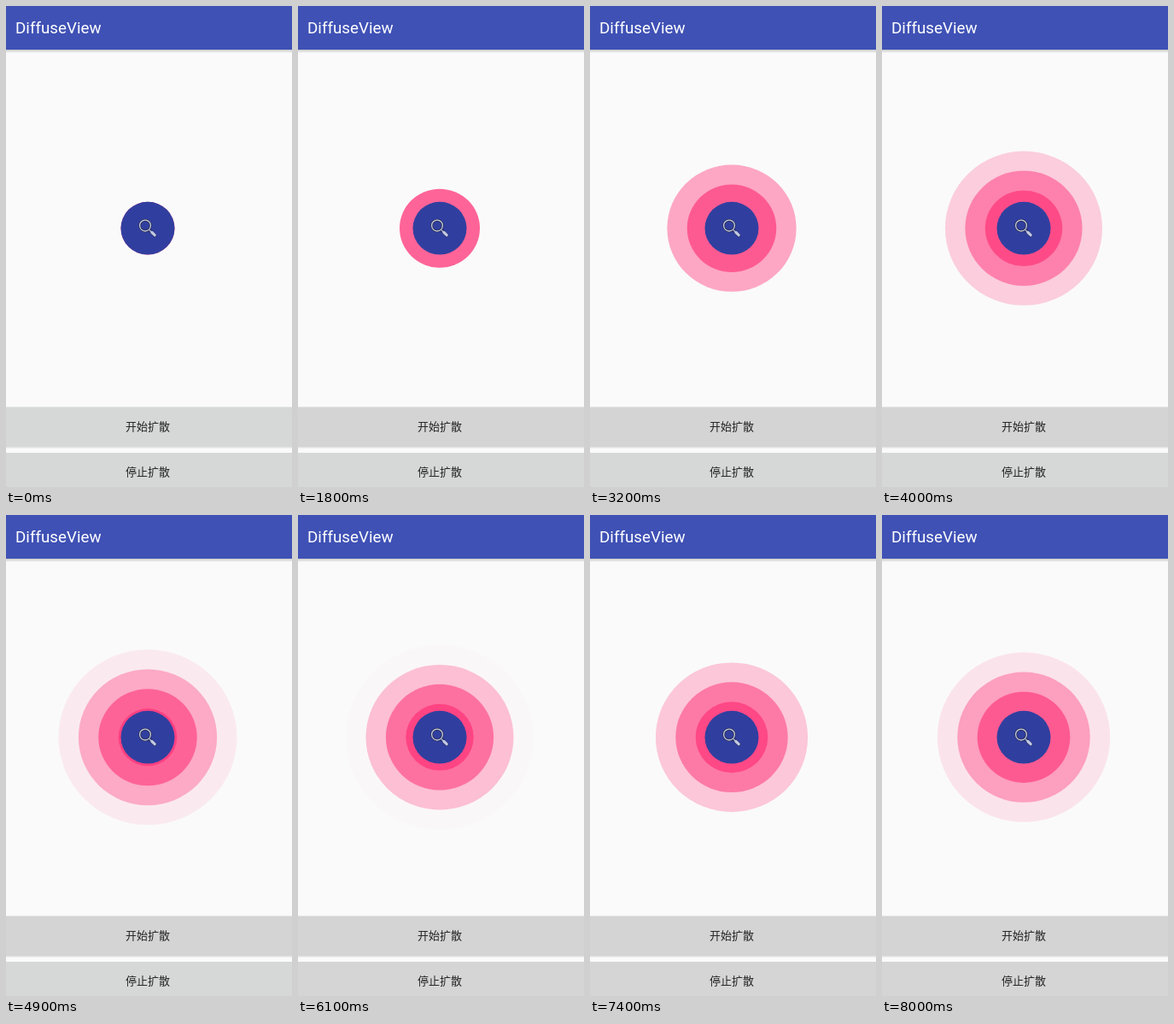
These frames come from a looping animation (335 by 562 pixels, 8.1 s). An HTML page with a canvas:

```html
<!DOCTYPE html>
<html lang="zh">
<head>
<meta charset="utf-8">
<title>DiffuseView</title>
<style>
  html, body { margin: 0; width: 100%; height: 100%; overflow: hidden; background: #fafafa; }
  canvas { display: block; width: 335px; height: 562px; }
</style>
</head>
<body>
<canvas id="stage"></canvas>
<script>
const W = 335, H = 562, LOOP = 8100, STEP = 100;
const CX = 166, CY = 259.7, SQUASH = 0.98;
const CORE = 31.5, GAP = 23.4, FADE = 79.6;

const canvas = document.getElementById('stage');
const ctx = canvas.getContext('2d');
const dpr = window.devicePixelRatio || 1;
canvas.width = W * dpr;
canvas.height = H * dpr;
ctx.scale(dpr, dpr);

function rect(y, h, color) {
  ctx.fillStyle = color;
  ctx.fillRect(0, y, W, h);
}

function shadow(y, h, strength) {
  const g = ctx.createLinearGradient(0, y, 0, y + h);
  g.addColorStop(0, `rgba(0,0,0,${strength})`);
  g.addColorStop(1, 'rgba(0,0,0,0)');
  rect(y, h, g);
}

function disc(r, color) {
  ctx.fillStyle = color;
  ctx.beginPath();
  ctx.ellipse(CX, CY, r, r * SQUASH, 0, 0, Math.PI * 2);
  ctx.fill();
}

function line(x1, y1, x2, y2, width, color) {
  ctx.strokeStyle = color;
  ctx.lineWidth = width;
  ctx.beginPath();
  ctx.moveTo(x1, y1);
  ctx.lineTo(x2, y2);
  ctx.stroke();
}

function lens(r, width, color) {
  ctx.strokeStyle = color;
  ctx.lineWidth = width;
  ctx.beginPath();
  ctx.arc(163, 256.6, r, 0, Math.PI * 2);
  ctx.stroke();
}

function searchIcon() {
  ctx.lineCap = 'round';
  line(168, 261.8, 174.2, 267.9, 4.6, '#28336f');
  lens(6.3, 3, '#28305f');
  lens(6.4, 1.3, '#c9cbd8');
  line(168.2, 262, 170.5, 264.2, 1.3, '#b4b8cf');
  line(170.9, 264.5, 174.2, 267.7, 3.2, '#c3c8e2');
}

function header() {
  rect(0, 51, '#3f51b5');
  shadow(51, 4, 0.2);
  ctx.fillStyle = '#fff';
  ctx.font = '18.8px Roboto, sans-serif';
  ctx.textAlign = 'left';
  ctx.fillText('DiffuseView', 11, 32.3);
}

function button(y, h, color, label, baseline) {
  rect(y, h, color);
  shadow(y + h, 2.5, 0.12);
  ctx.fillStyle = '#222';
  ctx.font = '13px "Noto Sans CJK SC", "Noto Sans CJK", sans-serif';
  ctx.textAlign = 'center';
  ctx.fillText(label, CX, baseline);
}

// Radius of the oldest ring: spreads, is stopped for a while, then spreads on.
function spread(n) {
  if (n < 11) return CORE;
  if (n <= 46) return 32.7 + 2.045 * (n - 11);
  if (n < 59) return 104.5;
  return 105.9 + 2 * (n - 59);
}

function rings(first) {
  for (let r = first; r >= CORE; r -= GAP) {
    const alpha = 1 - (r - CORE) / FADE;
    if (alpha > 0) disc(r, `rgba(255,64,129,${alpha})`);
  }
}

function draw(t) {
  const n = Math.floor(t / STEP);
  rect(0, H, '#fafafa');
  header();
  rings(spread(n));
  disc(CORE, '#303f9f');
  searchIcon();
  button(468.5, 46.5, n < 11 ? '#d6d7d7' : '#d4d4d4', '开始扩散', 495.9);
  button(522, 46, n < 59 ? '#d6d7d7' : '#d5d5d5', '停止扩散', 549.4);
}

const start = performance.now();
function tick() {
  draw((performance.now() - start) % LOOP);
  requestAnimationFrame(tick);
}
tick();
</script>
</body>
</html>
```
